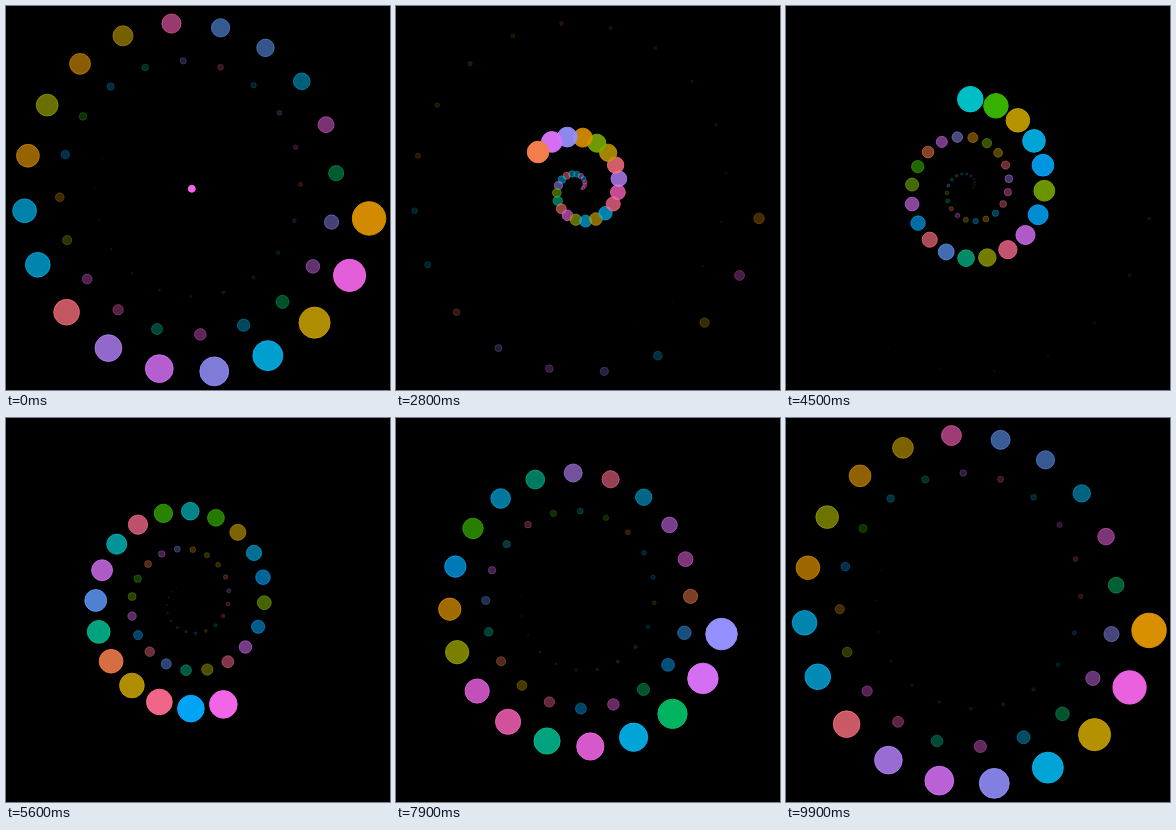
These frames come from a looping animation (384x384 px, 10000 ms). An HTML page without scripts:

```html
<!DOCTYPE html>
<html lang="en">
<head>
<meta charset="utf-8">
<title>Spiral wake</title>
<style>
@property --age { syntax: "<number>"; inherits: false; initial-value: 0; }

html, body { margin: 0; width: 100%; height: 100%; overflow: hidden; background: #000; }
svg { display: block; width: 384px; height: 384px; }

/* dot index = group + row + column */
g { --g: 0; }
g:nth-child(2) { --g: 20; }
g:nth-child(3) { --g: 40; }
g:nth-child(4) { --g: 60; }
g:nth-child(5) { --g: 80; }

circle { --row: 0; --col: 0; }
circle:nth-child(n+6) { --row: 5; }
circle:nth-child(n+11) { --row: 10; }
circle:nth-child(n+16) { --row: 15; }
circle:nth-child(5n+2) { --col: 1; }
circle:nth-child(5n+3) { --col: 2; }
circle:nth-child(5n+4) { --col: 3; }
circle:nth-child(5n) { --col: 4; }

circle {
  --i: calc(var(--g) + var(--row) + var(--col));
  /* five turns over 99 intervals */
  --turn: calc(9deg - var(--i) * 1800deg / 99);
  --reach: calc(var(--i) + 1.5);
  --left: max(0, 1 - var(--age) / 65);
  --fall: calc(var(--left) * var(--left));
  cx: calc(183.1px + 1.813px * var(--reach) * cos(var(--turn)));
  cy: calc(182.3px + 1.917px * var(--reach) * sin(var(--turn)));
  r: calc((3.5px + 1.38px * sqrt(var(--i))) * var(--fall));
  /* see-through outline over the fill leaves a brighter rim */
  fill: currentColor;
  stroke: currentColor;
  stroke-width: 1px;
  fill-opacity: var(--fall);
  stroke-opacity: var(--fall);
  animation: wake 10s steps(100) calc(var(--i) * 100ms - 10001ms) infinite;
}
@keyframes wake { from { --age: 0; } to { --age: 100; } }

.a { color: #f8766d; }
.b { color: #f37d4c; }
.c { color: #d99000; }
.d { color: #c09b00; }
.e { color: #9da700; }
.f { color: #7cae00; }
.g { color: #39b600; }
.h { color: #00be67; }
.j { color: #00c094; }
.k { color: #00bfc4; }
.l { color: #00b4ec; }
.m { color: #00a9ff; }
.n { color: #619cff; }
.o { color: #9590ff; }
.p { color: #b983ff; }
.q { color: #db72fb; }
.r { color: #f265e7; }
.s { color: #ff62bc; }
.t { color: #ff6c90; }
.u { color: #fc717f; }
.v { color: #35a2ff; }
</style>
</head>
<body>
<svg viewBox="0 0 384 384">
<g>
<circle class="r"/><circle class="s"/><circle class="r"/><circle class="t"/><circle class="m"/>
<circle class="q"/><circle class="k"/><circle class="l"/><circle class="u"/><circle class="l"/>
<circle class="o"/><circle class="f"/><circle class="j"/><circle class="a"/><circle class="r"/>
<circle class="e"/><circle class="l"/><circle class="d"/><circle class="l"/><circle class="t"/>
</g>
<g>
<circle class="s"/><circle class="p"/><circle class="u"/><circle class="d"/><circle class="f"/>
<circle class="c"/><circle class="o"/><circle class="q"/><circle class="b"/><circle class="g"/>
<circle class="f"/><circle class="q"/><circle class="m"/><circle class="u"/><circle class="n"/>
<circle class="j"/><circle class="e"/><circle class="t"/><circle class="q"/><circle class="m"/>
</g>
<g>
<circle class="f"/><circle class="m"/><circle class="l"/><circle class="d"/><circle class="g"/>
<circle class="k"/><circle class="g"/><circle class="t"/><circle class="k"/><circle class="q"/>
<circle class="n"/><circle class="j"/><circle class="b"/><circle class="d"/><circle class="t"/>
<circle class="m"/><circle class="r"/><circle class="h"/><circle class="m"/><circle class="v"/>
</g>
<g>
<circle class="b"/><circle class="r"/><circle class="q"/><circle class="l"/><circle class="t"/>
<circle class="p"/><circle class="j"/><circle class="l"/><circle class="g"/><circle class="m"/>
<circle class="c"/><circle class="e"/><circle class="r"/><circle class="s"/><circle class="j"/>
<circle class="r"/><circle class="l"/><circle class="h"/><circle class="q"/><circle class="o"/>
</g>
<g>
<circle class="h"/><circle class="r"/><circle class="l"/><circle class="n"/><circle class="n"/>
<circle class="s"/><circle class="d"/><circle class="c"/><circle class="e"/><circle class="c"/>
<circle class="l"/><circle class="l"/><circle class="u"/><circle class="p"/><circle class="q"/>
<circle class="o"/><circle class="l"/><circle class="d"/><circle class="r"/><circle class="c"/>
</g>
</svg>
</body>
</html>
```
